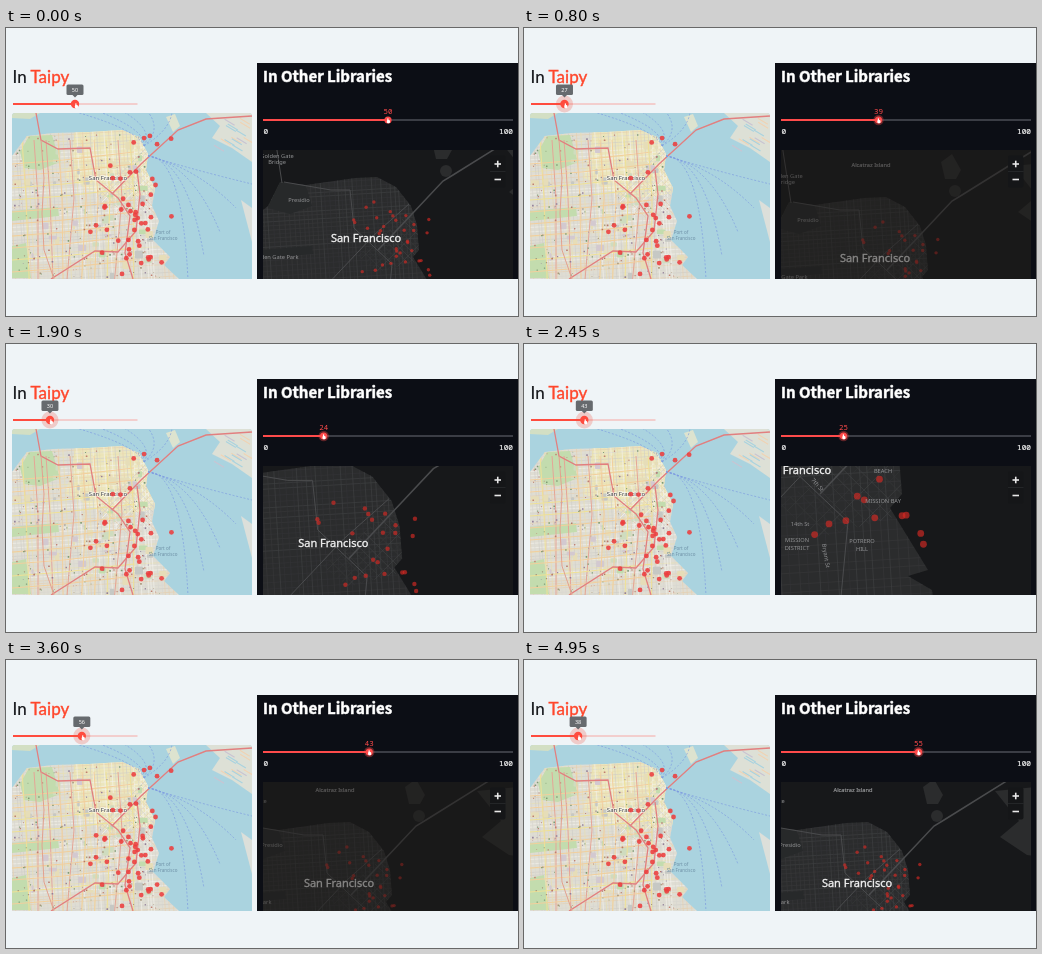
An HTML page with a canvas for the animation above (5000 ms loop, 512x288 px).

```html
<!DOCTYPE html>
<html lang="en">
<head>
<meta charset="utf-8">
<title>Map comparison</title>
<style>
html, body { margin: 0; width: 100%; height: 100%; overflow: hidden; background: #eff4f7; }
canvas { display: block; }
</style>
</head>
<body>
<canvas id="stage" width="512" height="288"></canvas>
<script>
const LOOP = 5000;
const ctx = document.getElementById('stage').getContext('2d');
const SANS = '"Noto Sans", sans-serif', MONO = '"Noto Sans Mono", monospace';
const TITLE = 'bold 15px "Noto Sans CJK JP", "Noto Sans CJK", "Open Sans", sans-serif';

let seed = 7;
const rand = () => (seed = seed * 16807 % 2147483647) / 2147483647;
const spread = () => (rand() + rand() + rand() - 1.5) * 2;
const pick = list => list[Math.floor(rand() * list.length)];
const cloud = (count, x, y, sx, sy) =>
  Array.from({ length: count }, () => [x + sx * spread(), y + sy * spread()]);

function trace(g, pts, close) {
  g.beginPath();
  for (let i = 0; i < pts.length; i += 2) g.lineTo(pts[i], pts[i + 1]);
  if (close) g.closePath();
}
function fill(g, color, pts) { trace(g, pts, true); g.fillStyle = color; g.fill(); }
function line(g, color, width, pts) {
  trace(g, pts);
  g.strokeStyle = color;
  g.lineWidth = width;
  g.stroke();
}
function disc(g, color, x, y, r) {
  g.fillStyle = color;
  g.beginPath();
  g.arc(x, y, r, 0, 7);
  g.fill();
}
function box(g, color, x, y, w, h, r) {
  g.fillStyle = color;
  g.beginPath();
  g.roundRect(x, y, w, h, r);
  g.fill();
}
function text(g, str, x, y, font, color, { align = 'center', angle = 0, heavy = 0 } = {}) {
  g.save();
  g.translate(x, y);
  g.rotate(angle);
  g.font = font;
  g.fillStyle = g.strokeStyle = color;
  g.textAlign = align;
  g.fillText(str, 0, 0);
  if (heavy) {
    g.lineWidth = heavy;
    g.strokeText(str, 0, 0);
  }
  g.restore();
}
// A grid of streets around a centre, in two directions
function streets(g, cx, cy, angle, step, reach, width, colors) {
  g.save();
  g.translate(cx, cy);
  g.rotate(angle);
  for (let side = 0; side < 2; side++) {
    for (let p = -reach; p < reach; p += step * (0.7 + rand() * 0.6))
      line(g, pick(colors), width, [-reach, p, reach, p]);
    g.rotate(Math.PI / 2);
  }
  g.restore();
}
// Straight moves between keys of the form [time, ...values]
function track(keys, t) {
  let i = 0;
  while (i < keys.length - 2 && keys[i + 1][0] <= t) i++;
  const [a, b] = [keys[i], keys[i + 1]];
  const u = Math.min(1, (t - a[0]) / (b[0] - a[0]));
  return a.slice(1).map((v, k) => v + (b[k + 1] - v) * u);
}
function hand(x, y) {
  box(ctx, '#fff', x - 1.2, y, 3.2, 3.2, 1.2);
  box(ctx, '#fff', x - 0.7, y - 1.8, 1.2, 3, 0.6);
}

// ---- Light map, painted once ----
const lightMap = document.createElement('canvas');
lightMap.width = 512;
lightMap.height = 288;

function paintLightMap(g) {
  g.beginPath();
  g.roundRect(6, 85, 240, 166, [3, 3, 0, 0]);
  g.clip();
  g.fillStyle = '#aad3df';
  g.fillRect(0, 0, 512, 288);

  fill(g, '#d3dfc4', [6, 85, 34, 85, 24, 91, 6, 90]);
  fill(g, '#dde0d6', [200, 85, 246, 85, 246, 134, 226, 120, 206, 110, 214, 98]);
  fill(g, '#dcdfda', [235, 172, 246, 180, 246, 214]);
  fill(g, '#dde3cf', [160, 89, 169, 86, 174, 98, 167, 104]);
  for (let i = 0; i < 14; i++) {
    const x = 208 + rand() * 32, y = 86 + rand() * 34;
    line(g, pick(['#c9c4d2', '#f0d3b4', '#aad3df']), 1.2, [x, y, x + 10, y + 6]);
  }

  g.save();
  trace(g, [6, 128, 21, 108, 47, 105, 83, 104, 116, 102, 133, 109, 142, 126, 140, 142, 149, 160, 146, 178,
    153, 193, 147, 212, 164, 229, 158, 237, 174, 252, 6, 252], true);
  g.fillStyle = '#dfddd3';
  g.fill();
  g.clip();
  fill(g, '#ece6bd', [70, 100, 150, 100, 150, 165, 105, 172, 60, 150]);
  const plain = ['#f3f2ee', '#cfcdc8', '#e9dfae', '#d8d6d0', '#e7cfae'];
  streets(g, 70, 180, -0.06, 3.6, 125, 0.6, plain);
  g.save();
  trace(g, [140, 116, 88, 168, 118, 190, 152, 186], true);
  g.clip();
  streets(g, 120, 155, 0.78, 4, 60, 0.7, plain);
  g.restore();

  const green = '#c3dcae';
  fill(g, green, [14, 124, 23, 108, 46, 107, 54, 134, 34, 142, 18, 140]);
  fill(g, green, [6, 183, 52, 179, 53, 188, 6, 193]);
  fill(g, green, [6, 218, 20, 215, 25, 250, 6, 250]);
  for (let i = 0; i < 60; i++)
    box(g, pick([green, '#cfdcbf', '#d3c9d0', '#e6ddb8', '#c6c8c4']), 6 + rand() * 150, 112 + rand() * 136, 2 + rand() * 8, 2 + rand() * 6, 1);
  for (let i = 0; i < 10; i++) {
    const y = 136 + i * 12, x = 16 + i * 12;
    line(g, pick(['#f2cf9c', '#efe196']), 1, [6, y, 58, y - 4, 128, y - 12]);
    line(g, pick(['#f2cf9c', '#efe196', '#e5a596']), 1, [x, 112, x + 4, 170, x + rand() * 12 - 4, 251]);
  }
  for (let i = 0; i < 230; i++) {
    const s = 0.7 + rand();
    box(g, pick(['#b8786a', '#94809a', '#c07f72', '#7f9c74', '#a8977a']), 8 + rand() * 145, 106 + rand() * 144, s, s, 0.3);
  }
  g.restore();

  const highway = '#e27f7f';
  line(g, highway, 1.3, [30, 85, 35, 112, 52, 121, 84, 120, 90, 152, 112, 170, 124, 188, 119, 225, 127, 251]);
  line(g, highway, 1.4, [106, 166, 135, 136, 172, 102, 200, 91, 246, 88]);
  line(g, highway, 1.3, [45, 251, 89, 223, 112, 224, 130, 203, 134, 166, 131, 142]);
  line(g, '#e3a08e', 1, [35, 112, 38, 150, 36, 185, 38, 222, 48, 251]);

  // Ferry routes fan out from the pier
  g.strokeStyle = '#7d9be0';
  g.lineWidth = 0.7;
  g.setLineDash([2, 1.8]);
  for (let i = 0; i < 5; i++) {
    g.beginPath();
    g.moveTo(138, 118);
    g.quadraticCurveTo(132 + i * 8, 102, 70 + i * 24, 84);
    g.moveTo(142, 128);
    g.quadraticCurveTo(176 + i * 5, 128 + i * 4, 182 + i * 16, 252 - i * 24);
    g.stroke();
  }
  g.setLineDash([]);

  text(g, 'San Francisco', 102, 152, '6px ' + SANS, '#ffffffb0', { heavy: 1.5 });
  text(g, 'San Francisco', 102, 152, '6px ' + SANS, '#333');
  text(g, 'Port of', 157, 206, '4.5px ' + SANS, '#6d8fa5');
  text(g, 'San Francisco', 157, 211.5, '4.5px ' + SANS, '#6d8fa5');
}
paintLightMap(lightMap.getContext('2d'));

// ---- Left side ----
seed = 12;
const incidents = cloud(54, 131, 178, 19, 31);
const leftKeys = [[0, 50], [800, 27], [1450, 19], [2450, 43], [3200, 57], [4000, 54], [4950, 38], [5000, 38]];

function drawLeft(t) {
  const [value] = track(leftKeys, t), x = 7 + value * 1.24;
  const font = '17px Lato, sans-serif';
  text(ctx, 'In', 6.5, 55, font, '#16181c', { align: 'left', heavy: 0.2 });
  text(ctx, 'Taipy', 24.5, 55, font, '#ff462b', { align: 'left', heavy: 0.4 });
  line(ctx, '#f5a09a', 0.9, [x, 76, 131.5, 76]);
  line(ctx, '#ff4b3e', 1.8, [7, 76, x, 76]);
  if (t >= 50) disc(ctx, 'rgba(240,80,65,.25)', x, 76, 8.5);
  disc(ctx, '#ff4b3e', x, 76, 4.2);
  hand(x + 1, 77);
  box(ctx, '#666a6e', x - 8.5, 56.5, 17, 10.5, 1.5);
  fill(ctx, '#666a6e', [x - 2.5, 67, x + 2.5, 67, x, 69.5]);
  text(ctx, Math.round(value), x, 64, '5.5px ' + SANS, '#fff');

  ctx.drawImage(lightMap, 0, 0);
  for (const [px, py] of incidents.slice(0, Math.round(10 + 0.74 * value)))
    if (py < 249) disc(ctx, 'rgba(236,62,62,.88)', px, py, 2.4);
}

// ---- Dark map: a view is the city label's position and the zoom ----
const HOME = [360, 210];
const START = [360, 210, 1], PANNED = [351, 230, 1], ZOOMED = [272, 126, 2], RESET = [333, 223, 1];
const viewKeys = [[0, ...START], [150, ...START], [500, ...PANNED], [1750, ...PANNED],
  [2250, ...ZOOMED], [3550, ...ZOOMED], [3550, ...RESET], [LOOP, ...RESET]];
const coast = [225, 420, 228, 205, 262, 178, 274, 154, 300, 157, 349, 150, 371, 149, 390, 159, 405, 178, 411, 197,
  413, 222, 407, 229, 426, 260, 416, 263, 428, 270, 450, 420];
seed = 5;
const sightings = cloud(36, 393, 212, 25, 22);

function drawLand(g, px) {
  const land = '#2b2c2d', major = '#4a4b4d', greys = ['#333436', '#38393a', '#414244'];
  fill(g, land, [426, 114, 437, 106, 446, 122, 441, 131, 430, 131]);
  disc(g, land, 440, 143, 6);
  fill(g, land, [498, 118, 560, 112, 560, 186, 530, 182, 503, 164, 522, 148]);
  g.save();
  trace(g, coast, true);
  g.fillStyle = land;
  g.fill();
  g.clip();
  seed = 31;
  streets(g, 340, 240, -0.06, 4.5, 130, 0.6 * px, greys);
  fill(g, '#27292a', [262, 180, 274, 154, 300, 158, 306, 178, 284, 186]);
  fill(g, '#27292a', [230, 224, 306, 218, 307, 226, 230, 232]);
  trace(g, [412, 178, 352, 228, 372, 244, 414, 232], true);
  g.clip();
  streets(g, 390, 215, 0.78, 5, 60, 0.6 * px, greys);
  g.restore();
  line(g, major, px, [403, 176, 368, 207, 318, 260]);
  line(g, major, px, [278, 154, 325, 162, 344, 162, 348, 200, 386, 236, 380, 300]);
  line(g, major, 1.5 * px, [372, 222, 406, 186, 437, 153, 447, 147, 516, 104]);
  line(g, major, px, [266, 90, 276, 155]);
}

function drawDarkMap(t) {
  const g = ctx, [ox, oy, s] = track(viewKeys, t);
  const [sliderValue] = track(rightKeys, t);
  g.save();
  g.beginPath();
  g.rect(257, 122, 250, 129);
  g.clip();
  g.fillStyle = '#17181a';
  g.fillRect(257, 122, 250, 129);

  g.save();
  g.translate(ox, oy);
  g.scale(s, s);
  g.translate(-HOME[0], -HOME[1]);
  drawLand(g, 1 / s);
  for (const [x, y] of sightings.slice(0, Math.round(14 + 0.4 * sliderValue)))
    disc(g, 'rgba(215,42,36,.65)', x, y, 1.7);
  g.restore();

  // Label places are relative to the city label
  const label = (str, x, y, style) =>
    text(g, str, ox + x * s, oy + y * s, '5.7px ' + SANS, '#929395', style);
  if (s < 1.5) {
    label('Golden Gate', -89, -80);
    label('Bridge', -89, -74);
    label('Presidio', -67, -36);
    label('Alcatraz Island', -4, -91, { heavy: 0.2 });
    label('Golden Gate Park', -91, 21);
  } else {
    label('BEACH', 43.5, 1.5);
    label('MISSION BAY', 43.5, 16.5);
    label('POTRERO', 33, 36.5);
    label('HILL', 33, 40.5);
    label('MISSION', 0.5, 36);
    label('DISTRICT', 0.5, 40);
    label('14th St', 2, 28);
    label('Bryant St', 14, 43, { angle: 1.4 });
    label('7th St', 10, 8, { angle: 0.85 });
  }
  text(g, 'San Francisco', ox, oy + 4, '11px ' + SANS, '#f2f2f2', { heavy: 0.35 });

  // Fades while the page recomputes
  if ((t >= 550 && t < 1150) || (t >= 3600 && t < 4300)) {
    g.fillStyle = 'rgba(28,26,24,.5)';
    g.fillRect(257, 122, 250, 129);
  }
  g.restore();

  box(g, '#151618', 484, 127.5, 15.5, 32, 2);
  line(g, '#303133', 0.6, [484, 143.5, 499.5, 143.5]);
  for (const bar of [[488.5, 136, 495, 136], [491.75, 132.7, 491.75, 139.3], [488.5, 151.5, 495, 151.5]])
    line(g, '#e8e8e8', 1.6, bar);
}

// ---- Right side ----
const rightKeys = [[0, 50], [250, 50], [800, 39], [1450, 24], [1700, 24], [2450, 25], [3200, 39], [4000, 46], [4950, 55], [LOOP, 55]];

function drawRight(t) {
  const [value] = track(rightKeys, t), x = 257 + value * 2.5;
  ctx.fillStyle = '#0c0e15';
  ctx.fillRect(251, 35, 261, 216);
  text(ctx, 'In Other Libraries', 257, 54, TITLE, '#fff', { align: 'left', heavy: 0.5 });
  line(ctx, '#3b3d45', 2, [x, 92, 507, 92]);
  line(ctx, '#ff4b4b', 2, [257, 92, x, 92]);
  if (t >= 250) disc(ctx, 'rgba(255,75,75,.35)', x, 92, 5.2);
  disc(ctx, '#ff4b4b', x, 92, 3.6);
  hand(x, 92);
  text(ctx, Math.round(value), x, 86, '7.5px ' + MONO, '#ff4b4b');
  text(ctx, '0', 257.5, 106, '7.8px ' + MONO, '#f4f4f4', { align: 'left', heavy: 0.2 });
  text(ctx, '100', 507, 106, '7.8px ' + MONO, '#f4f4f4', { align: 'right', heavy: 0.2 });
  drawDarkMap(t);
}

function frame(now) {
  const t = Math.floor(now % LOOP / 50) * 50;
  ctx.fillStyle = '#eff4f7';
  ctx.fillRect(0, 0, 512, 288);
  drawLeft(t);
  drawRight(t);
  requestAnimationFrame(frame);
}
requestAnimationFrame(frame);
</script>
</body>
</html>
```
